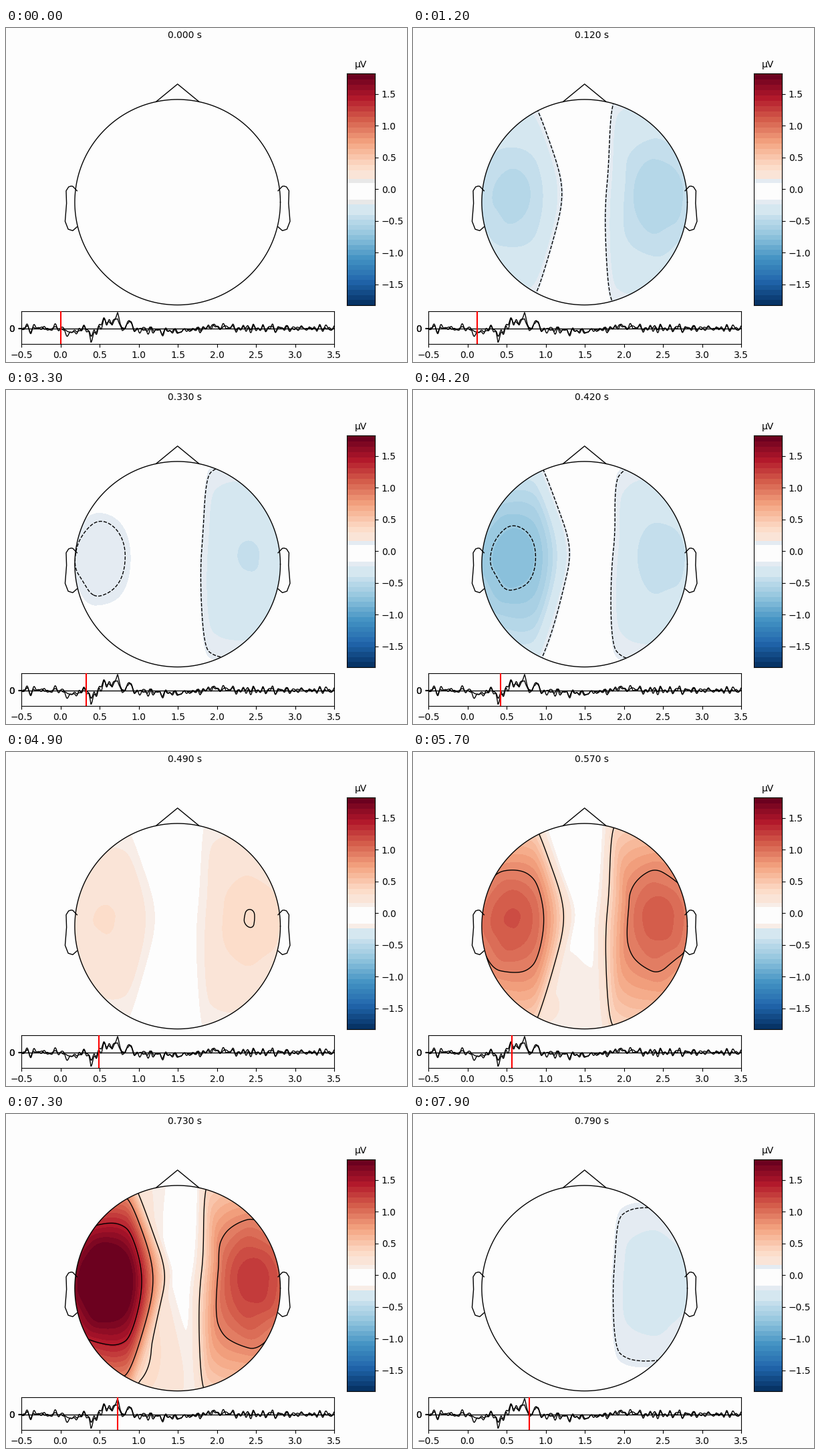
A matplotlib script for the animation above (8000 ms loop, 600 px wide and 500 px high).

```python
import numpy as np
import matplotlib.pyplot as plt
from matplotlib.animation import FuncAnimation
from matplotlib.colors import BoundaryNorm, ListedColormap, to_rgb
from matplotlib.patches import Circle
from matplotlib.tri import CubicTriInterpolator, Triangulation

W, H = 600, 500
CX, CY, R = 256.7, 260.8, 153.8      # head circle, px
VMAX = 1.827
FRAMES, STEP = 80, 0.01
BG = "#fdfdfd"
LEVELS = -1.77 + 0.532 * np.arange(1, 7)

plt.rcParams.update({"font.family": "DejaVu Sans", "font.size": 10})


# --- signals ---------------------------------------------------------------
# turning points of the response: time, left, right
RESPONSE = np.array([
    (0, 0, 0), (.12, -.45, -.48), (.24, -.28, 0), (.34, -.1, -.4),
    (.39, -1.62, -.9), (.42, -.7, -.38), (.57, 1.02, .98), (.66, .6, .375),
    (.73, 1.83, 1.1), (.79, 0, -.27), (.88, .9, .8), (.97, -.1, -.2)])
rng = np.random.default_rng(4)
times = np.linspace(-0.5, 3.5, 801)


def ripple():
    freq, phase = rng.uniform(3, 17, 12), rng.uniform(0, 2 * np.pi, 12)
    return 0.05 * np.sin(2 * np.pi * np.outer(times, freq) + phase).sum(axis=1)


def bump(center, width):
    return np.exp(-((times - center) / width) ** 2)


def signal(values):
    """Drift and ripple, bent to pass through the turning points."""
    base = drift + shared + ripple()
    keys = RESPONSE[:, 0]
    shift = values - np.interp(keys, times, base)
    ends = np.pad(shift, 1)
    return base + np.interp(times, [-0.1, *keys, 1.05], ends)


drift = 0.25 * bump(2.0, 0.15) - 0.35 * bump(1.4, 0.35)
shared = ripple()
left, right = signal(RESPONSE[:, 1]), signal(RESPONSE[:, 2])


# --- scalp interpolation ---------------------------------------------------
def gradients(pts, z, edges):
    """Slopes that minimise curvature along all edges."""
    n = len(pts)
    A, b = np.zeros((n, 2, n, 2)), np.zeros((n, 2))
    for i, j in np.vstack([edges, edges[:, ::-1]]):
        e = pts[j] - pts[i]
        d3 = np.hypot(*e) ** 3
        k = np.outer(e, e) / d3
        A[i, :, i, :] += 4 * k
        A[i, :, j, :] += 2 * k
        b[i] += 6 * (z[j] - z[i]) * e / d3
    return np.linalg.solve(A.reshape(2 * n, 2 * n), b.ravel()).reshape(n, 2)


sensors = np.array([(-73, 23), (0, 26.2), (74, 23)], float)
ring = np.linspace(0, 2 * np.pi, 13, endpoint=False)
outer = 241 * np.column_stack([np.cos(ring), np.sin(ring)])
points = np.vstack([sensors, outer])
tri = Triangulation(*points.T)
axis = np.linspace(-156, 156, 157)
X, Y = np.meshgrid(axis, axis)


def basis(idx):
    z = np.zeros(len(points))
    z[idx] = 1
    g = gradients(points, z, tri.edges)
    interp = CubicTriInterpolator(tri, z, kind="user", dz=(g[:, 0], g[:, 1]))
    return np.asarray(interp(X, Y).filled(0))


left_map, right_map = basis(0), basis(2)


# --- colours ---------------------------------------------------------------
edges = np.concatenate([np.linspace(-VMAX, -.40, 19), [-.23, -.16, .10, .17],
                        np.linspace(.30, VMAX, 19)])
norm = BoundaryNorm(edges, len(edges) - 1)


def banded(tint):
    mids = (edges[:-1] + edges[1:]) / 2
    colors = plt.get_cmap("RdBu_r")((mids / VMAX + 1) / 2)[:, :3]
    mid = int(np.searchsorted(edges, 0)) - 1
    colors[mid] = to_rgb(BG)
    colors[[mid - 1, mid + 1]] = to_rgb(tint)
    return ListedColormap(colors)


GREY, BLUE, RED = map(banded, ("#e8e8e8", "#e4ebf2", "#f8ede7"))


# --- figure ----------------------------------------------------------------
fig = plt.figure(figsize=(W / 100, H / 100), dpi=100, facecolor=BG)


def axes_px(x0, y0, x1, y1):
    return fig.add_axes([x0 / W, 1 - y1 / H, (x1 - x0) / W, (y1 - y0) / H],
                        facecolor=BG)


def frame_head():
    head.set(xlim=(-CX, W - CX), ylim=(CY - H, CY))


head = axes_px(0, 0, W, H)
head.axis("off")
image = head.imshow(np.zeros_like(X), extent=(-157, 157, -157, 157),
                    origin="lower", aspect="auto", cmap=GREY, norm=norm,
                    interpolation="bilinear", interpolation_stage="data")
frame_head()
clip = Circle((0, 0), R, transform=head.transData)
image.set_clip_path(clip)

angle = np.linspace(0, 2 * np.pi, 201)
ear_x, ear_y = np.transpose([
    (.978, .111), (1.02, .155), (1.036, .157), (1.06, .149), (1.084, .111),
    (1.08, -.011), (1.094, -.186), (1.064, -.263), (1.02, -.277), (.978, -.24)])
nose = np.arccos(np.deg2rad(12))
for x, y in [(np.cos(angle), np.sin(angle)),
             (np.cos([nose, np.pi / 2, np.pi - nose]),
              [np.sin(nose), 1.15, np.sin(nose)]),
             (ear_x, ear_y), (-ear_x, ear_y)]:
    head.plot(R * x, R * np.asarray(y), "k", lw=1, zorder=4)
clock = head.text(293.2 - CX, CY - 11.4, "", ha="right", va="center")

cbar = axes_px(510, 67.7, 552, 414.7)
scale = cbar.imshow(np.linspace(-VMAX, VMAX, 694)[:, None], origin="lower",
                    extent=(0, 1, -VMAX, VMAX), aspect="auto", cmap=GREY,
                    norm=norm, interpolation="nearest")
cbar.set_xticks([])
cbar.yaxis.tick_right()
cbar.set_yticks(np.arange(-1.5, 1.6, 0.5))
cbar.set_title("µV", fontsize=10)

trace = axes_px(23, 424, 491, 473)
for values in (left, 0 * times, right):
    trace.plot(times, values, "k", lw=1)
trace.set(xlim=(-0.5, 3.5), ylim=(-1.82, 1.98))
trace.set_xticks(np.arange(-0.5, 3.6, 0.5))
trace.set_yticks([0, 0.01], ["0", "0"])
cursor = trace.axvline(0, color="r", lw=1.5, zorder=5)

contours = []


def draw(frame):
    t = frame * STEP
    field = (np.interp(t, times, left) * left_map
             + np.interp(t, times, right) * right_map)
    low, high = field.min(), field.max()
    cmap = GREY if max(high, -low) < 0.1 else RED if high > -low else BLUE
    image.set_data(field)
    for im in (image, scale):
        im.set_cmap(cmap)

    while contours:
        contours.pop().remove()
    levels = LEVELS[(LEVELS > low) & (LEVELS < high)]
    if len(levels):
        lines = head.contour(X, Y, field, levels=levels, colors="k", linewidths=1)
        lines.set_clip_path(clip)
        contours.append(lines)
        frame_head()

    clock.set_text(f"{t:.3f} s")
    cursor.set_xdata([t, t])
    return []


anim = FuncAnimation(fig, draw, frames=FRAMES, interval=100,
                     init_func=lambda: draw(0), repeat=True, repeat_delay=0)
plt.show()
```
